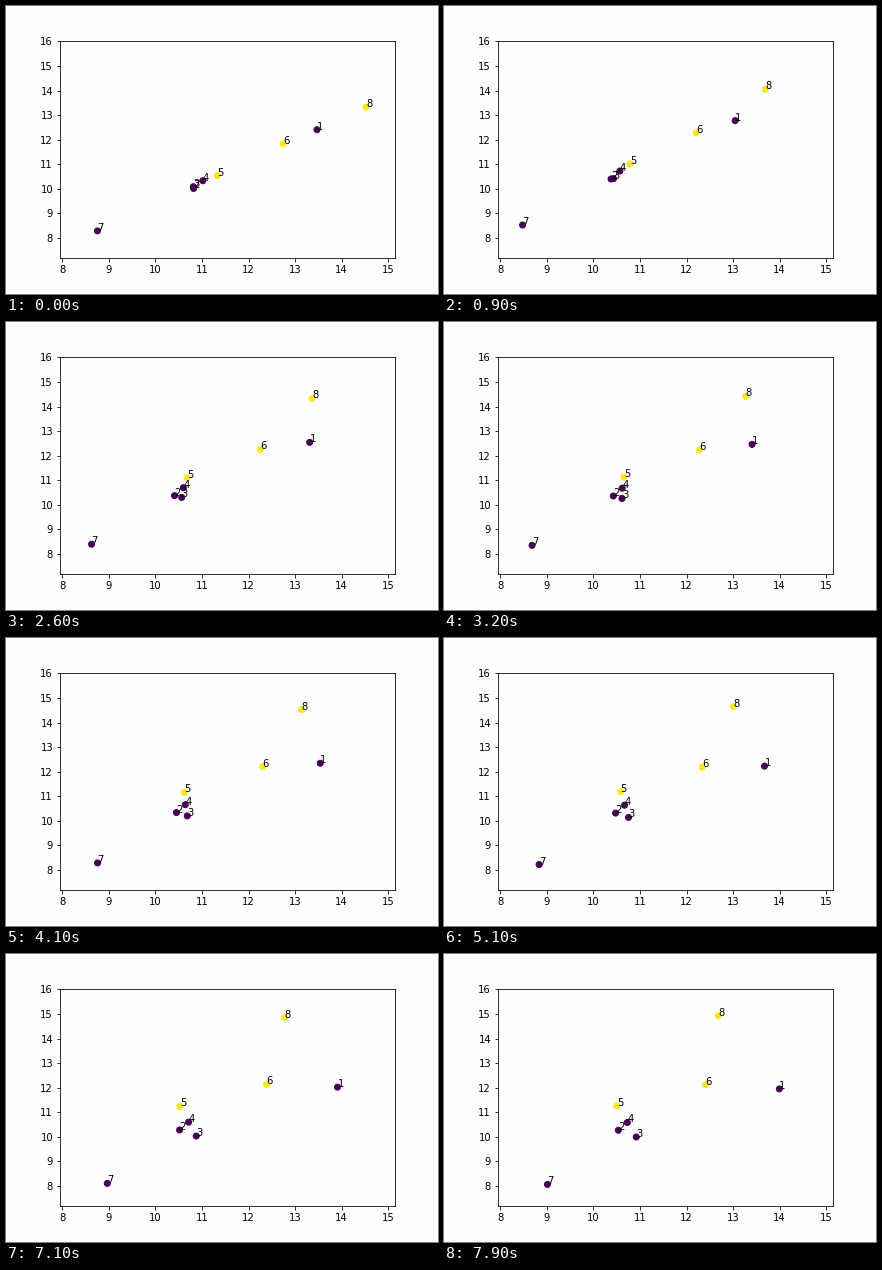
A matplotlib script that plays this animation: 432x288 px, repeating every 8 s.

```python
import numpy as np
import matplotlib.pyplot as plt
from matplotlib.animation import FuncAnimation

STEPS = 80
STEP_MS = 100
MOMENTUM = 0.5               # the first swing is a damped heavy-ball motion
PULL = 0.417
TAU = 111                    # time constant of the slow drift, in steps
AXIS = np.array([1, -0.87])  # every point slides along this direction
PAPER = "#fefefe"

# Home x, home y, drift along AXIS by the last step
x, y, spread = np.array([
    (12.841, 12.953, 1.155),
    (10.323, 10.445, 0.210),
    (10.317, 10.514, 0.603),
    (10.511, 10.769, 0.216),
    (10.804, 10.993, -0.305),
    (12.147, 12.344, 0.262),
    (8.359, 8.625, 0.652),
    (13.842, 13.920, -1.158)]).T
home = np.column_stack([x, y])
reach = 0.053 * x - 0.05     # size of the first swing
classes = [0, 0, 0, 0, 1, 1, 0, 1]


def swing_curve(n):
    swing = [1.0, 1.0 - PULL]
    while len(swing) < n:
        swing.append((1 + MOMENTUM - PULL) * swing[-1] - MOMENTUM * swing[-2])
    return swing


swing = swing_curve(STEPS)


def drift(step):
    return np.expm1(-step / TAU) / np.expm1(-(STEPS - 1) / TAU)


def positions(step):
    slide = spread * drift(step) + reach * swing[step]
    return home + np.outer(slide, AXIS)


plt.rcParams["font.family"] = "DejaVu Sans"
fig = plt.figure(figsize=(6, 4), dpi=72, facecolor=PAPER)
ax = fig.add_axes([0.125, 0.125, 0.775, 0.755], facecolor=PAPER)
ax.set(xlim=(7.9473, 15.145), ylim=(7.179, 16.036),
       xticks=range(8, 16), yticks=range(8, 17))

dots = ax.scatter(x, y, c=classes, cmap="viridis")
labels = [ax.text(*point, str(i)) for i, point in enumerate(home, 1)]


def update(step):
    points = positions(step)
    dots.set_offsets(points)
    for label, point in zip(labels, points):
        label.set_position(point)
    return [dots, *labels]


anim = FuncAnimation(fig, update, frames=STEPS, interval=STEP_MS,
                     repeat=True, repeat_delay=0)
plt.show()
```
